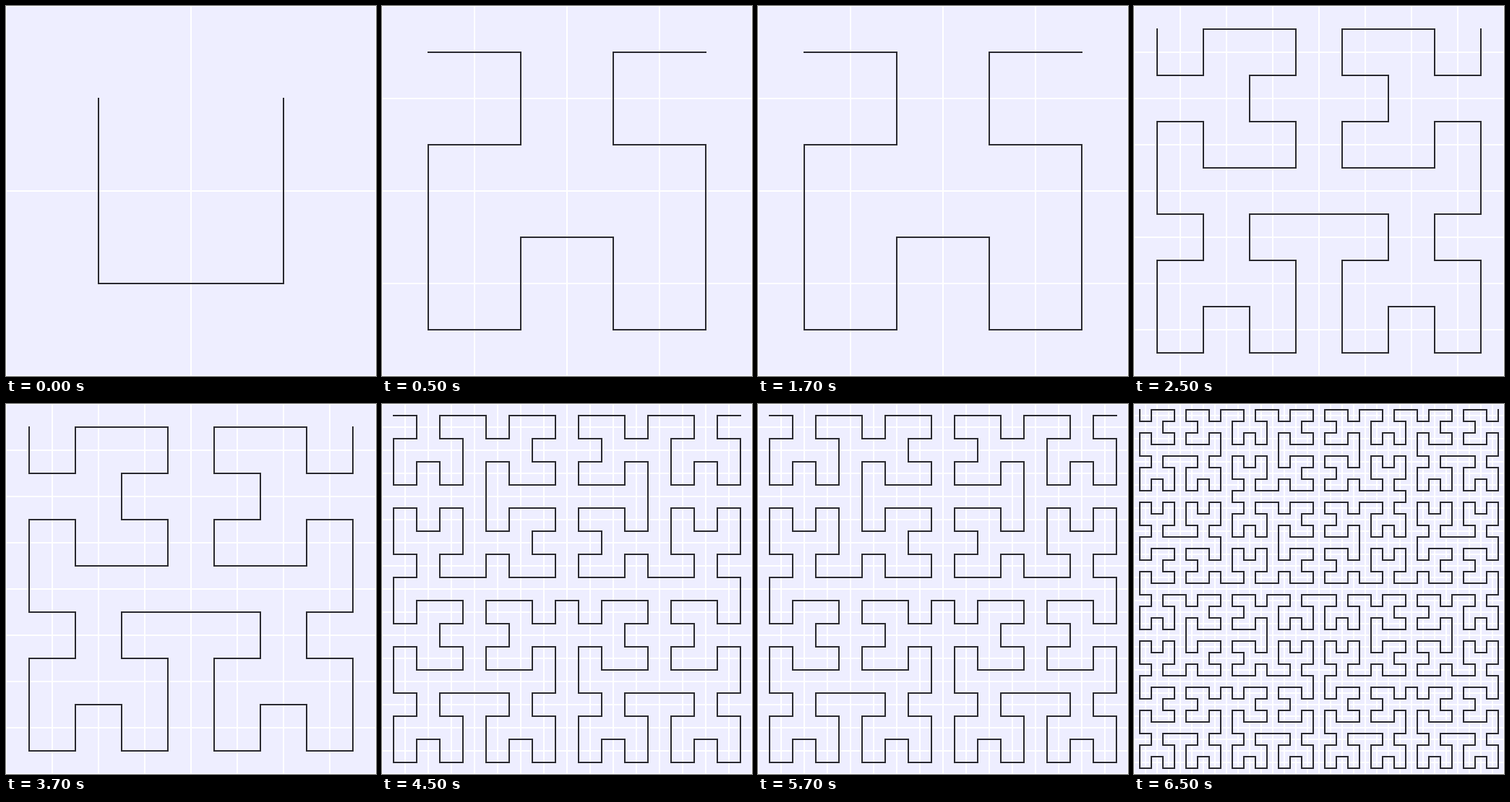
Recreate the animation shown at these times as an HTML page. Size 512 by 512 pixels, loop 8000 ms.

```html
<!DOCTYPE html>
<html lang="en">
<head>
<meta charset="utf-8">
<title>Hilbert curve, orders 1 to 5</title>
<style>
  html, body { margin: 0; width: 100%; height: 100%; overflow: hidden; background: #eef; }
  #strip { height: 500%; animation: orders 8s step-end infinite; }
  svg { display: block; width: 100%; height: 20%; background: #eef; }
  path { fill: none; stroke-width: 2; stroke-linecap: square; stroke-linejoin: miter; }
  .grid { stroke: #fff; }
  .curve { stroke: #2a2a30; }
  @keyframes orders {
    0% { transform: translateY(0); }
    6.25% { transform: translateY(-20%); }
    31.25% { transform: translateY(-40%); }
    56.25% { transform: translateY(-60%); }
    81.25%, 100% { transform: translateY(-80%); }
  }
</style>
</head>
<body>
<div id="strip"></div>
<script>
  const SIZE = 512;

  // Cell of the Hilbert curve at distance d, on an n by n grid.
  function cell(n, d) {
    let x = 0, y = 0;
    for (let s = 1; s < n; s *= 2, d >>= 2) {
      const rx = (d >> 1) & 1;
      const ry = (d ^ rx) & 1;
      if (!ry) {
        if (rx) [x, y] = [s - 1 - x, s - 1 - y];
        [x, y] = [y, x];
      }
      x += s * rx;
      y += s * ry;
    }
    return [x, y];
  }

  function curvePath(n) {
    const step = SIZE / n;
    const points = Array.from({ length: n * n }, (_, d) =>
      cell(n, d).map(v => (v + 0.5) * step).join(","));
    return "M" + points.join("L");
  }

  function gridPath(n) {
    let path = "";
    for (let i = 0; i <= n; i++) {
      const p = i * SIZE / n;
      path += `M${p},0V${SIZE}M0,${p}H${SIZE}`;
    }
    return path;
  }

  const panel = n => `<svg viewBox="0 0 ${SIZE} ${SIZE}">
    <path class="grid" d="${gridPath(n)}"/><path class="curve" d="${curvePath(n)}"/></svg>`;

  document.getElementById("strip").innerHTML = [2, 4, 8, 16, 32].map(panel).join("");
</script>
</body>
</html>
```
